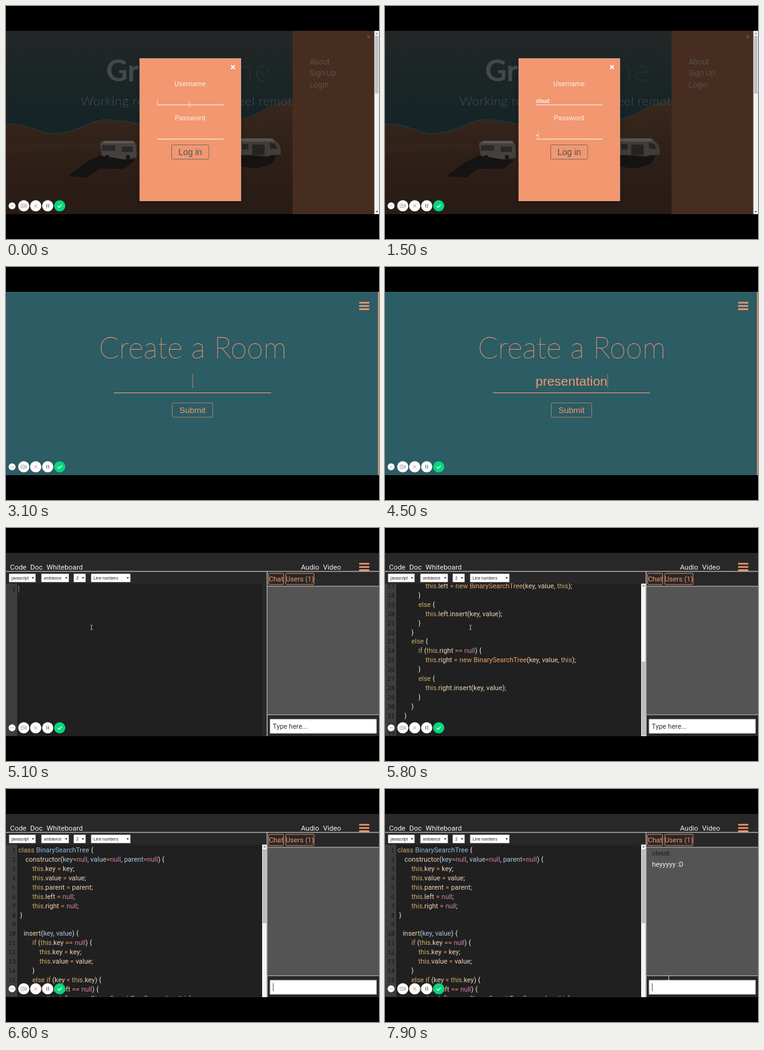
Animation, 600 px wide and 375 px high, one loop 8 s. Source, as an HTML page:

```html
<!DOCTYPE html>
<html lang="en">
<head>
<meta charset="utf-8">
<title>Room demo</title>
<style>
html, body { margin: 0; width: 100%; height: 100%; overflow: hidden; background: #000; }
svg { display: block; width: 100vw; height: 100vh; }
text { white-space: pre; }
.rob { font-family: Roboto, sans-serif; }
.ari { font-family: "Liberation Sans", Arial, sans-serif; }
.lat { font-family: Lato, sans-serif; }
.mono { font-family: "Noto Sans Mono", monospace; }
</style>
</head>
<body>
<svg id="stage" viewBox="0 0 600 375" xmlns="http://www.w3.org/2000/svg">
  <defs>
    <clipPath id="page"><rect y="40" width="600" height="295"/></clipPath>
    <clipPath id="lines"><rect y="89.5" width="412" height="245"/></clipPath>
    <linearGradient id="sea" x2="0" y2="1">
      <stop offset="0" stop-color="#242727"/><stop offset=".28" stop-color="#1a2526"/><stop offset=".5" stop-color="#152427"/>
    </linearGradient>
    <linearGradient id="land" x2="0" y2="1">
      <stop offset="0" stop-color="#38271c"/><stop offset=".45" stop-color="#2f2018"/><stop offset="1" stop-color="#281b15"/>
    </linearGradient>
    <filter id="soft" x="-20%" y="-20%" width="140%" height="140%"><feGaussianBlur stdDeviation="3"/></filter>
  </defs>
  <rect width="600" height="375"/>
  <g clip-path="url(#page)">
    <g id="login"></g>
    <g id="room"></g>
    <g id="editor"></g>
    <g id="bar"></g>
    <g id="mouse"></g>
  </g>
</svg>
<script>
const LOOP = 8000;
const ORANGE = '#f2976f';
const USER = 'cloud';
const $ = id => document.getElementById(id);

function el(parent, tag, attrs, content) {
  const node = document.createElementNS('http://www.w3.org/2000/svg', tag);
  for (const k in attrs) node.setAttribute(k, attrs[k]);
  if (content !== undefined) node.textContent = content;
  parent.appendChild(node);
  return node;
}
const rect = (p, x, y, width, height, fill, more) =>
  el(p, 'rect', { x, y, width, height, fill, ...more });
const path = (p, d, stroke, width = 1, more) =>
  el(p, 'path', { d, stroke, 'stroke-width': width, fill: 'none', ...more });
const shape = (p, d, fill) => el(p, 'path', { d, fill });
const text = (p, x, y, size, cls, fill, str, more) =>
  el(p, 'text', { x, y, 'font-size': size, class: cls, fill, ...more }, str);
const MID = { 'text-anchor': 'middle' };
const show = (node, on) => node.setAttribute('display', on ? 'inline' : 'none');

function menuIcon(p) {
  for (const y of [56.2, 61.4, 66.6]) rect(p, 568, y, 16.4, 2.6, ORANGE, { rx: .6 });
}

// Login page
const login = $('login');
rect(login, 0, 40, 600, 295, 'url(#sea)');
shape(login, 'M0 191Q22 190 42 198T74 207Q100 206 122 196T156 184Q186 184 215 192L378 184Q400 178 416 168T461 153V335H0Z', 'url(#land)');
path(login, 'M0 190Q22 189 42 197T74 206Q100 205 122 195T156 183Q186 183 215 191M378 183Q400 177 416 167T461 152', '#2c302c', 2);
shape(login, 'M0 222Q70 214 150 222V232Q70 228 0 238Z', '#33231a');
shape(login, 'M100 274L128 252L152 240L208 248L190 262L150 262L130 276Z', '#151313');
shape(login, 'M378 241L436 240L428 254L402 262L378 258Z', '#151313');
shape(login, 'M151 222Q153 217 160 217H204Q209 219 210 228V244L190 247L154 241Z', '#45413d');
shape(login, 'M155 224H176V233H154ZM186 226H204V235H186Z', '#2c2a28');
shape(login, 'M158 217H204L207 221H155Z', '#5b5751');
shape(login, 'M378 213L428 213Q440 220 442 230V239L420 242L378 239Z', '#413d39');
shape(login, 'M378 213H428L432 218H378Z', '#57534d');
shape(login, 'M380 222H390V231H380ZM396 223H416V240H396ZM424 220L433 222L437 230H425Z', '#252424');
for (const x of [163, 196, 388, 428]) el(login, 'circle', { cx: x, cy: 243, r: 3.2, fill: '#161514' });
text(login, 161, 121, 48, 'lat', '#43494a', 'Grove', { 'font-weight': 700 });
text(login, 428, 121, 48, 'lat', '#3c4446', 'Lune', { 'font-weight': 100, 'text-anchor': 'end', 'letter-spacing': 3 });
text(login, 296, 160, 20.4, 'lat', '#464d4e', "Working remote shouldn't feel remote",
  { 'font-weight': 300, 'letter-spacing': .5, ...MID });
rect(login, 461, 40, 132, 295, '#472d20');
['About', 'Sign Up', 'Login'].forEach((s, i) =>
  text(login, 488.5, 93.5 + i * 18.6, 12.5, 'rob', '#60605d', s, { 'font-weight': 300 }));
path(login, 'M581.3 47.3l4.4 4.4m0-4.4l-4.4 4.4', '#5d5855', 1.4);
rect(login, 592.5, 40, 7.5, 295, '#f1f1f1');
rect(login, 593.6, 48, 5.4, 93, '#c1c1c1');
shape(login, 'M594.7 45.2l1.8-2.2l1.8 2.2z', '#777');
shape(login, 'M594.7 330l1.8 2.2l1.8-2.2z', '#333');
rect(login, 214, 85, 165, 230, '#000', { opacity: .25, filter: 'url(#soft)' });
rect(login, 215.2, 84.7, 162.6, 228.8, ORANGE, { stroke: '#f3bfa5', 'stroke-width': .8 });
path(login, 'M362.2 95.4l5.8 5.8m0-5.8l-5.8 5.8', '#fff', 2.1);
for (const [s, y] of [['Username', 129], ['Password', 184]]) {
  text(login, 296, y, 11.1, 'rob', '#fdeee6', s, MID);
  rect(login, 243, y + 29.6, 107, 1.2, '#fdeae0');
}
rect(login, 266.5, 223.5, 59.5, 23, 'none', { stroke: '#71696a', 'stroke-width': .9, rx: 1.5 });
text(login, 296.3, 239.8, 14, 'ari', '#47565c', 'Log in', MID);
const nameText = text(login, 243, 156.3, 8.6, 'rob', '#fff', '', { 'font-weight': 500 });
const dots = el(login, 'g', {});
for (let i = 0; i < 10; i++) el(dots, 'circle', { cx: 244.5 + i * 3.05, cy: 208.3, r: 1.15, fill: '#fff' });
const loginCaret = rect(login, 243, 149.5, .7, 9.5, '#fde6da');

// Room page
const room = $('room');
rect(room, 0, 40, 600, 295, '#2c5c64');
rect(room, 0, 40, 600, .8, '#3d6a71');
const edge = rect(room, 598.4, 40, 1.6, 295, ORANGE);
menuIcon(room);
text(room, 300.5, 146.7, 47.5, 'lat', ORANGE, 'Create a Room',
  { 'font-weight': 100, 'letter-spacing': .2, stroke: ORANGE, 'stroke-width': .35, ...MID });
rect(room, 173.5, 202, 253, 1.1, ORANGE);
rect(room, 267.5, 218.8, 65, 23, 'none', { stroke: '#b58572', 'stroke-width': .9, rx: 1.5 });
text(room, 300, 234.6, 13.5, 'ari', ORANGE, 'Submit', MID);
const roomText = text(room, 300, 191, 21, 'ari', ORANGE, '', MID);
const roomCaret = rect(room, 300, 172, .8, 23, '#c9866a');

// Editor page
const editor = $('editor');
rect(editor, 0, 40, 600, 295, '#282828');
for (const [s, x] of [['Code', 6.5], ['Doc', 39], ['Whiteboard', 65.3], ['Audio', 474.5], ['Video', 510]])
  text(editor, x, 67, 11.4, 'rob', '#f2f2f2', s);
menuIcon(editor);
rect(editor, 0, 69.3, 600, 1.1, '#d5d5d5');
for (const [s, x, w] of [['javascript', 5, 42.5], ['ambiance', 57, 44], ['2', 109, 19], ['Line numbers', 137, 63]]) {
  rect(editor, x, 73.8, w, 13.2, '#fff', { stroke: '#aaa', 'stroke-width': .5 });
  text(editor, x + 4, 82.7, 6.5, 'ari', '#222', s);
  shape(editor, `M${x + w - 6} 79.2h3.6l-1.8 2.8z`, '#222');
}
const view = el(editor, 'g', { 'clip-path': 'url(#lines)' });
rect(view, 0, 89, 412, 246, '#202020');
rect(view, 0, 89, 18.5, 246, '#3d3d3d');
rect(view, 18.5, 89, 1, 246, '#171717');

const STEP = 14.93, MAX_SCROLL = 244;
const CODE = `class BinarySearchTree {
    constructor(key=null, value=null, parent=null) {
        this.key = key;
        this.value = value;
        this.parent = parent;
        this.left = null;
        this.right = null;
 }

   insert(key, value) {
        if (this.key == null) {
            this.key = key;
            this.value = value;
        }
        else if (key < this.key) {
            if (this.left == null) {
                this.left = new BinarySearchTree(key, value, this);
            }
            else {
                this.left.insert(key, value);
            }
        }
        else {
            if (this.right == null) {
                this.right = new BinarySearchTree(key, value, this);
            }
            else {
                this.right.insert(key, value);
            }
        }
    }

`.split('\n');

function tint(word, line, before) {
  if (/^(class|this|new|if|else)$/.test(word)) return '#cda869';
  if (word === 'null') return '#cf7ea9';
  if (/^[=<]+$/.test(word)) return '#fa8d6a';
  if (word === 'BinarySearchTree') return /new $/.test(before) ? '#e9a56f' : '#8fb9dc';
  if (/^ +(constructor|insert)\(/.test(line) && /^(key|value|parent)$/.test(word)) return '#aac6e3';
  return /^\w/.test(word) ? '#eed1b3' : '#e6e1dc';
}
const sheet = el(view, 'g', {});
const rows = CODE.map((line, i) => {
  const row = el(sheet, 'g', {}), y = 102 + i * STEP;
  text(row, 15.5, y, 9.6, 'mono', '#141414', i + 1, { 'text-anchor': 'end' });
  const t = text(row, 20, y, 10.95, 'rob', '#e6e1dc', '', { 'word-spacing': .1 });
  for (const m of line.matchAll(/\w+|[=<]+|[^\w=<]+/g))
    el(t, 'tspan', { fill: tint(m[0], line, line.slice(0, m.index)) }, m[0]);
  return row;
});
const codeCaret = rect(view, 20, 92, .8, 12, '#7991e8');

const scrollBar = el(editor, 'g', {});
rect(scrollBar, 412, 89.5, 7.5, 245.5, '#f4f4f4');
shape(scrollBar, 'M413.8 94l2-2.4l2 2.4z', '#666');
const thumb = rect(scrollBar, 412.8, 97, 6, 119, '#bdbdbd');

rect(editor, 419.5, 70, 1.2, 265, '#d5d5d5');
rect(editor, 420.7, 93.5, 179.3, 207, '#555455');
rect(editor, 420.7, 93.3, 179.3, .9, '#c9c9c9');
rect(editor, 420.7, 300.2, 179.3, .9, '#c9c9c9');
for (const [s, x, w] of [['Chat', 422.5, 24], ['Users (1)', 450, 45.5]]) {
  rect(editor, x, 73, w, 18, 'none', { stroke: ORANGE, 'stroke-width': .9, rx: 1.5 });
  text(editor, x + w / 2, 86, 11.2, 'rob', ORANGE, s, MID);
}
rect(editor, 424.8, 307.8, 171.2, 22.7, '#fff', { stroke: '#bbb', 'stroke-width': .6 });
const chatText = text(editor, 429, 322.8, 11, 'rob', '#333', '');
const chatCaret = rect(editor, 429.5, 312.5, .9, 13, '#333');
const message = el(editor, 'g', {});
text(message, 429.5, 107, 11, 'rob', '#2c2b2b', USER + ':', { 'font-weight': 700 });
text(message, 429.5, 125.3, 11, 'rob', '#f2f2f2', 'heyyyyy :D');

// Recorder buttons
const bar = $('bar');
const disc = (cx, r, fill) => el(bar, 'circle', { cx, cy: 321.6, r, fill });
disc(9.8, 5.6, '#fff');
path(bar, 'M7.4 321.6h4.8', '#999', .8);
for (const x of [28.6, 47.8, 67.1]) disc(x, 9, '#fff');
disc(86.4, 9, '#06d77e');
rect(bar, 24.2, 318.8, 6, 5.6, 'none', { stroke: '#8a8f94', 'stroke-width': .8, rx: 1 });
path(bar, 'M30.4 321l2.6-1.7v4.6l-2.6-1.7', '#8a8f94', .8);
el(bar, 'circle', { cx: 27.2, cy: 321.6, r: 1, fill: '#8a8f94' });
const cross = path(bar, 'M45.2 319l5.2 5.2m0-5.2l-5.2 5.2', '#b08a86', 1);
path(bar, 'M65.6 318.6v6m3-6v6', '#767b80', 1.3);
path(bar, 'M83.2 321.8l2.3 2.3l4.2-4.5', '#fff', 1.3);

// Pointer
const mouse = $('mouse');
path(mouse, 'M-1.8-3.6Q0-3.6 0-2.4Q0-3.6 1.8-3.6M0-2.4V2.4M-1.8 3.6Q0 3.6 0 2.4Q0 3.6 1.8 3.6', '#ddd', .8);

const clamp = v => Math.max(0, Math.min(1, v));
const ease = v => v * v * (3 - 2 * v);
const typed = (t, from, gap, count) =>
  Math.max(0, Math.min(count, Math.floor((t - from) / gap) + 1));
const blink = (t, since) => t < since || (t - since) % 1060 < 530;
const put = (node, str) => { if (node.textContent !== str) node.textContent = str; };

function drawLogin(t) {
  const n = typed(t, 300, 200, USER.length);
  const p = typed(t, 1450, 145, 10);
  put(nameText, USER.slice(0, n));
  [...dots.children].forEach((d, i) => show(d, i < p));
  const inPass = t >= 1300;
  const w = n ? nameText.getComputedTextLength() : 0;
  loginCaret.setAttribute('x', inPass ? 243 + p * 3.05 + .5 : 243 + w);
  loginCaret.setAttribute('y', inPass ? 203.5 : 149.5);
  show(loginCaret, blink(t, inPass ? 2755 : 1100));
}

function drawRoom(t) {
  const word = 'presentation';
  const n = typed(t, 3400, 95, word.length);
  put(roomText, word.slice(0, n));
  const w = n ? roomText.getComputedTextLength() : 0;
  roomCaret.setAttribute('x', 299.9 + w / 2);
  show(roomCaret, blink(t, n ? 4445 : 3100));
  edge.setAttribute('fill', t < 3100 ? '#f1f1f1' : ORANGE);
}

function drawEditor(t) {
  const pasted = t >= 5500;
  rows.forEach((r, i) => show(r, pasted || i === 0));
  show(rows[0].lastChild, pasted);
  show(codeCaret, !pasted && blink(t, 5000));
  show(scrollBar, pasted);
  const s = 1 - ease(clamp((t - 5850) / 600));
  sheet.setAttribute('transform', `translate(0 ${pasted ? -MAX_SCROLL * s : 0})`);
  thumb.setAttribute('y', 97 + 118 * s);
  const str = 'heyyyyy :D', sent = t >= 7700, focus = t >= 6550;
  const n = sent ? 0 : typed(t, 6700, 100, str.length);
  put(chatText, focus ? str.slice(0, n) : 'Type here...');
  chatCaret.setAttribute('x', 429.5 + (n ? chatText.getComputedTextLength() : 0));
  show(chatCaret, focus && blink(t, 7700));
  show(message, sent);
}

function drawMouse(t) {
  let x = 295, y = 159.5;
  if (t > 5000) {
    const k = ease(clamp((t - 6450) / 100));
    x = 137.5 + 319 * k;
    y = 160 + 158 * k;
  }
  if (t >= 7700) { x = 456.5; y = 304; }
  mouse.setAttribute('transform', `translate(${x} ${y})`);
  show(mouse, t < 250 || (t >= 5000 && t < 6550) || t >= 7700);
}

function draw(t) {
  show(login, t < 3000);
  show(room, t >= 3000 && t < 5000);
  show(editor, t >= 5000);
  cross.setAttribute('stroke', t < 3000 ? '#b08a86' : '#e08a66');
  if (t < 3000) drawLogin(t);
  else if (t < 5000) drawRoom(t);
  else drawEditor(t);
  drawMouse(t);
}

const start = performance.now();
function tick() {
  draw((performance.now() - start) % LOOP);
  requestAnimationFrame(tick);
}
tick();
</script>
</body>
</html>
```
